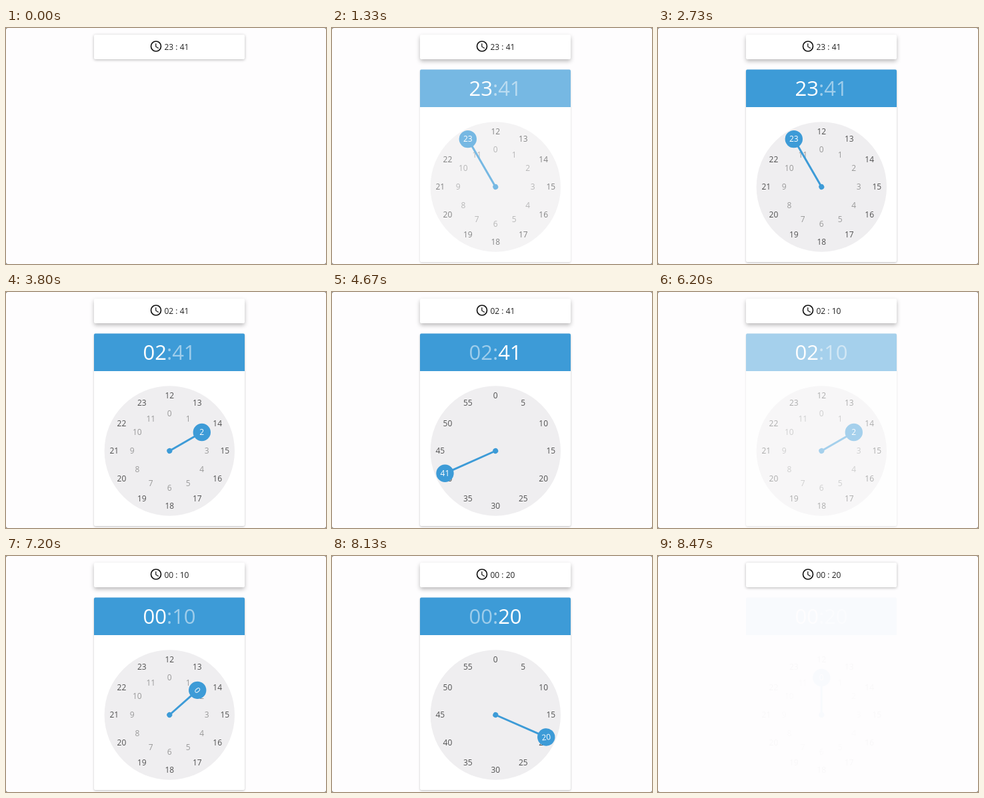
An HTML page that plays this animation: 480x355 px, repeating every 9.99 s.

```html
<!DOCTYPE html>
<html lang="en">
<head>
<meta charset="utf-8">
<title>Time picker</title>
<style>
  html, body { margin: 0; width: 100%; height: 100%; overflow: hidden; background: #777; }
  #stage { position: relative; width: 480px; height: 355px; overflow: hidden; background: #fefdfe; border-radius: 3px; }
  .card { position: absolute; left: 132px; width: 226px; background: #fff; border-radius: 2px; }
  #field { top: 10px; height: 37px; box-shadow: 0 1px 4px rgba(0,0,0,.28); }
  #field.hover { box-shadow: 0 3px 6px rgba(0,0,0,.27); }
  #panel { position: absolute; inset: 0; opacity: 0; }
  #panel .card { top: 62.5px; height: 289px; box-shadow: 0 1px 3px rgba(0,0,0,.25); }
  svg { position: absolute; left: 0; top: 0; }
  text { font: 12px "Open Sans", "Noto Sans", sans-serif; white-space: pre; }
  .mid { text-anchor: middle; }
  #head { font-size: 31px; fill: #fff; }
  .outer { fill: #505050; }
  .inner { fill: #999; }
</style>
</head>
<body>
<div id="stage">
  <div id="field" class="card"></div>
  <svg width="480" height="355">
    <g transform="translate(215 17.5) scale(.833)">
      <circle cx="12" cy="12" r="9" fill="none" stroke="#111" stroke-width="2"/>
      <path d="M11 7h1.5v5.25l4.5 2.67-.75 1.23L11 13z" fill="#111"/>
    </g>
    <text id="value" x="237.5" y="33" fill="#222"></text>
  </svg>
  <div id="panel">
    <div class="card"></div>
    <svg width="480" height="355">
      <path d="M132 119V64.5q0-2 2-2h222q2 0 2 2V119z" fill="#3d9bd7"/>
      <text id="head" class="mid" x="245" y="102"><tspan id="hh"></tspan><tspan id="colon" fill-opacity=".5">:</tspan><tspan id="mm"></tspan></text>
      <g transform="translate(245.3 239)">
        <circle r="97.7" fill="#efeef0"/>
        <g id="hours"></g>
        <g id="minutes"></g>
        <g id="hand" fill="#3d9bd7">
          <circle r="4"/>
          <line id="arm" stroke="#3d9bd7" stroke-width="3"/>
          <g id="knob">
            <circle r="13.2"/>
            <text id="label" class="mid" y="4.3" fill="#fff"></text>
          </g>
        </g>
      </g>
    </svg>
  </div>
</div>
<script>
const LOOP = 9990, STEP = 1000 / 15, OUTER = 83, INNER = 56;
const $ = id => document.getElementById(id);

// start, target angle, radius, label, duration
const moves = [
  [0, -30, OUTER, '23', 0],
  [3170, 60, INNER, '2', 550],
  [3850, 246, OUTER, '41', 600],
  [4690, 60, OUTER, '10', 450],
  [5180, 60, INNER, '2', 0],
  [7000, 0, INNER, '0', 550],
  [7550, 60, OUTER, '10', 330],
  [7880, 120, OUTER, '20', 360],
  [8330, 0, INNER, '0', 0]
];
const hourSteps = [[0, '23'], [3170, '02'], [7000, '00']];
const minuteSteps = [[0, '41'], [4690, '10'], [7880, '20']];
const views = [[0, 'hours'], [3850, 'minutes'], [5180, 'hours'], [7550, 'minutes'], [8330, 'hours']];
const fade = [
  [0, 0], [1270, 0], [1333, .7], [1400, .88], [1533, 1],
  [5140, 1], [5333, 0], [6133, 0], [6200, .46], [6400, .9], [6533, 1],
  [8270, 1], [8466, .03], [LOOP, .03]
];

const lastIndex = (table, t) => table.findLastIndex(row => row[0] <= t);
const current = (table, t) => table[lastIndex(table, t)];
const ease = p => p < .5 ? 4 * p ** 3 : 1 - (2 - 2 * p) ** 3 / 2;
const polar = (deg, r) => [r * Math.sin(deg * Math.PI / 180), -r * Math.cos(deg * Math.PI / 180)];

function lerp(table, t) {
  const i = Math.min(lastIndex(table, t), table.length - 2);
  const [t0, a] = table[i], [t1, b] = table[i + 1];
  return a + (b - a) * (t - t0) / (t1 - t0);
}

function ring(group, r, cls, name) {
  for (let i = 0; i < 12; i++) {
    const [x, y] = polar(i * 30, r);
    const el = document.createElementNS('http://www.w3.org/2000/svg', 'text');
    el.setAttribute('class', 'mid ' + cls);
    el.setAttribute('x', x);
    el.setAttribute('y', y + 4.3);
    el.textContent = name(i);
    group.append(el);
  }
}

function drawHand(t) {
  const i = lastIndex(moves, t);
  const [start, target, r, label, dur] = moves[i];
  const from = i ? moves[i - 1][1] : target;
  const p = dur ? ease(Math.min(1, (t - start) / dur)) : 1;
  const angle = from + (target - from) * p;
  $('hand').setAttribute('transform', `rotate(${angle})`);
  $('arm').setAttribute('y2', -r);
  $('knob').setAttribute('transform', `translate(0 ${-r}) rotate(${-target})`);
  $('label').textContent = label;
}

function render(t) {
  const h = current(hourSteps, t)[1], m = current(minuteSteps, t)[1];
  const [since, view] = current(views, t);
  const onMinutes = view === 'minutes';
  $('value').textContent = `${h} : ${m}`;
  $('hh').textContent = h;
  $('mm').textContent = m;
  $('hh').setAttribute('fill-opacity', onMinutes ? .5 : 1);
  $('mm').setAttribute('fill-opacity', onMinutes ? 1 : .5);
  const shown = onMinutes ? Math.min(1, (t - since) / 250) : 0;
  $('minutes').setAttribute('opacity', shown);
  $('hours').setAttribute('opacity', 1 - shown);
  $('field').classList.toggle('hover', t > 1300 && t < 8300);
  $('panel').style.opacity = lerp(fade, t);
  drawHand(t);
}

ring($('hours'), OUTER, 'outer', i => i + 12);
ring($('hours'), INNER, 'inner', i => i);
ring($('minutes'), OUTER, 'outer', i => i * 5);

const begin = performance.now();
function tick() {
  const t = (performance.now() - begin) % LOOP;
  render(Math.min(LOOP, Math.floor((t + 4) / STEP) * STEP));
  requestAnimationFrame(tick);
}
tick();
</script>
</body>
</html>
```
